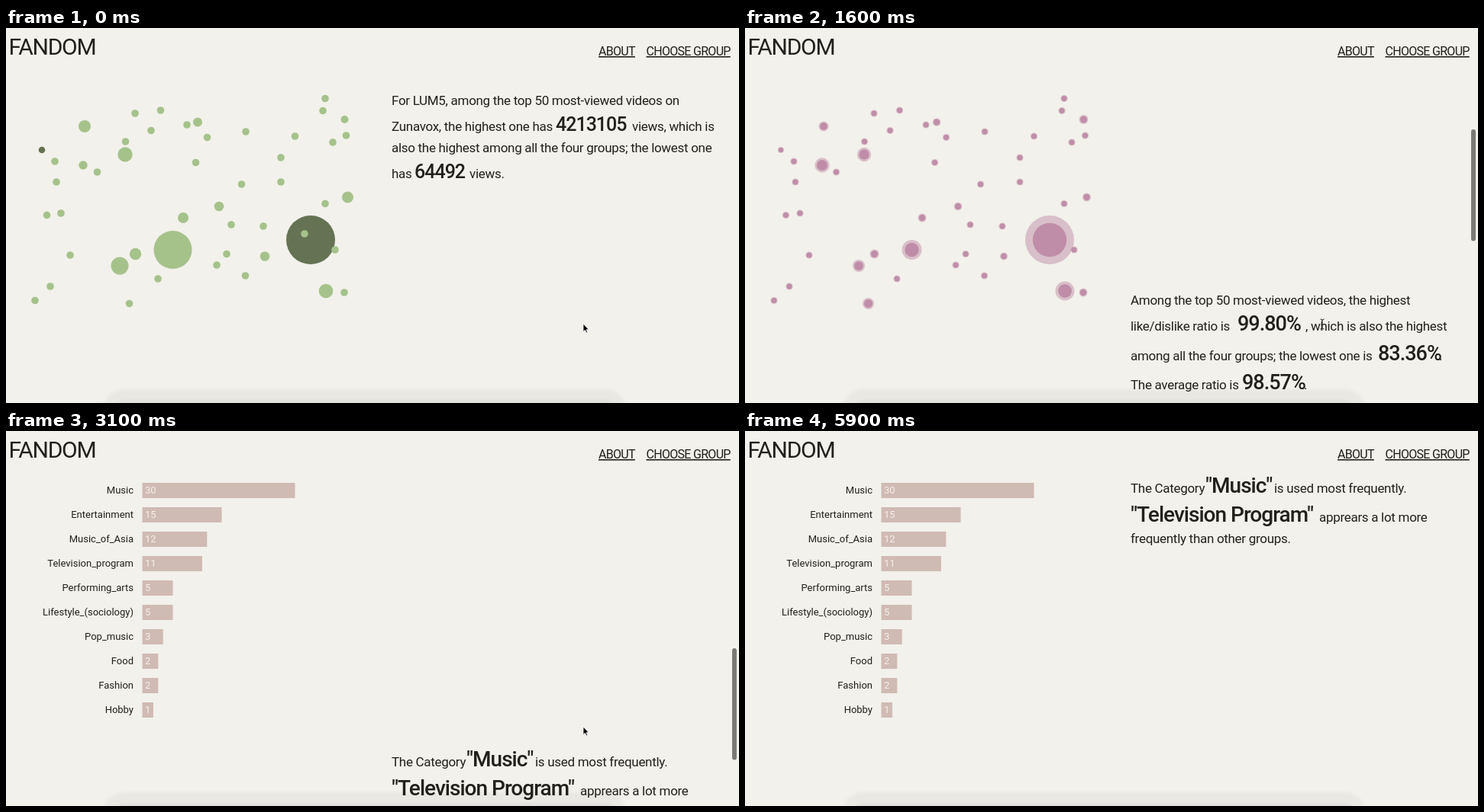
These frames come from a looping animation (960 px wide and 492 px high, 6600 ms). An HTML page:

```html
<!DOCTYPE html>
<html lang="en">
<head>
<meta charset="utf-8">
<title>Fandom</title>
<style>
html, body { margin: 0; width: 100%; height: 100%; overflow: hidden; background: #f2f1eb; }
svg { display: block; width: 100vw; height: 100vh; font: 17px Roboto, sans-serif; fill: #21201c; }
#story text { letter-spacing: -.3px; white-space: pre; }
#story .big { font-weight: 500; letter-spacing: -1px; }
.logo { font-size: 30px; letter-spacing: -1.3px; }
.nav { font-size: 16px; letter-spacing: -.7px; text-decoration: underline; }
#bars { font-size: 13px; }
#bars rect { fill: #d0bab4; }
#bars .value { fill: #f6efe9; }
#bars .label { text-anchor: end; }
</style>
</head>
<body>
<svg viewBox="0 0 960 492">
  <defs>
    <filter id="soft" x="-5%" width="110%" y="-50%" height="200%"><feGaussianBlur stdDeviation="2"/></filter>
  </defs>
  <g id="dots"></g>
  <g id="bars"></g>
  <g id="story"></g>
  <rect width="960" height="44" fill="#f2f1eb"/>
  <text class="logo" x="3.5" y="35">FANDOM</text>
  <text class="nav" x="776" y="36">ABOUT</text>
  <text class="nav" x="838.5" y="36">CHOOSE GROUP</text>
  <g filter="url(#soft)">
    <rect x="128" y="474" width="684" height="60" rx="26" fill-opacity=".035"/>
    <rect x="142" y="488" width="658" height="40" rx="14" fill-opacity=".04"/>
  </g>
  <rect id="thumb" x="951" width="6" height="146.5" rx="3" fill="#7b7a76"/>
  <g id="cursor">
    <path id="arrow" d="M0 0V10.5L2.4 8.3L4 12L5.6 11.3L4.1 7.7H7.2Z" fill="#000" stroke="#fff" stroke-width=".8"/>
    <path id="beam" d="M-2.5-6Q0-6 0-4Q0-6 2.5-6M0-4V5M-2.5 7Q0 7 0 5Q0 7 2.5 7M-1.5 1.5H1.5" fill="none" stroke="#222"/>
  </g>
</svg>
<script>
const LOOP = 6600, STEP = 100;
const ORIGIN = [3, 48];
const GREEN = [166, 194, 139], DARK = [101, 114, 83], PINK = [192, 141, 168];

// x, y of every video
const spots = [
  103,129, 169,112, 202.5,108, 190,134.5, 237,127, 251,123.5, 263.5,143.5, 156.5,149, 156,166, 47,160,
  64,175, 101,180, 119.5,189, 66,202, 53.5,245.5, 72,243, 84,298, 58,339, 38,357.5, 161.5,361.5,
  199,329, 149,312, 169.5,296.5, 218.5,291, 232,249, 248.5,176.5, 279,234, 295,258, 289,296.5, 276,311,
  313.5,325, 339,299.5, 337,260, 308.5,205, 314,136, 360,170, 360,202, 378.5,142, 415,108.5, 418,92.5,
  443.5,120, 428,150, 445.5,141, 418,230.5, 447.5,222, 399,278, 391,270, 431,291, 419,345, 443,347
];
// radius by views, radius by ratio, where they differ from the usual
const USUAL = [4.8, 4.6];
const radii = {
  0: [8, 6.5], 5: [6, 5.3], 8: [9.7, 9.2], 9: [4.3, 4], 11: [5.7, 9.7], 19: [4.8, 7.5],
  21: [11.5, 8], 22: [7.7, 6], 23: [25, 13], 24: [7, 5.5], 26: [6.3, 5.3], 31: [6.3, 5],
  40: [5, 6], 44: [7.5, 5.5], 45: [32, 32], 48: [9.3, 12.5], 49: [4.8, 5.5]
};
const darkOnes = [9, 45];

const categories = {
  Music: 30, Entertainment: 15, Music_of_Asia: 12, Television_program: 11, Performing_arts: 5,
  "Lifestyle_(sociology)": 5, Pop_music: 3, Food: 2, Fashion: 2, Hobby: 1
};

// each piece: x, y, text, size when emphasised
const story = [
  [505, 101, "For LUM5, among the top 50 most-viewed videos on"],
  [505, 135, "Zunavox, the highest one has"], [720, 135, "4213105", 25], [820, 135, "views, which is"],
  [505, 163, "also the highest among all the four groups; the lowest one"],
  [505, 197, "has"], [535, 197, "64492", 25], [607, 197, "views."],

  [505, 673, "Among the top 50 most-viewed videos, the highest"],
  [505, 707, "like/dislike ratio is"], [645, 707, "99.80%", 27], [734, 707, ", which is also the highest"],
  [505, 746, "among all the four groups; the lowest one is"], [829, 746, "83.36%", 27], [909, 746, "."],
  [505, 784, "The average ratio is"], [651, 784, "98.57%", 27], [732, 784, "."],

  [505, 1255, "The Category"], [603, 1255, '"Music"', 28], [693, 1255, "is used most frequently."],
  [505, 1293, '"Television Program"', 28], [752, 1293, "apprears a lot more"],
  [505, 1321, "frequently than other groups."]
];

// time, page scroll
const scrollKeys = [
  [0, 0], [100, 13], [700, 156], [1100, 207], [1400, 259], [2000, 413], [2800, 737],
  [3100, 815], [3900, 1051], [4200, 1102], [4600, 1169], [4800, 1174], [LOOP, 1174]
];

const $ = id => document.getElementById(id);
const clamp = v => Math.max(0, Math.min(1, v));
const mix = (a, b, k) => a + (b - a) * k;
const ease = v => (v = clamp(v)) < .5 ? 4 * v ** 3 : 1 - 4 * (1 - v) ** 3;

function set(el, attrs) {
  for (const name in attrs) el.setAttribute(name, attrs[name]);
}
function add(parent, tag, attrs, text = "") {
  const el = document.createElementNS("http://www.w3.org/2000/svg", tag);
  set(el, attrs);
  el.textContent = text;
  return parent.appendChild(el);
}

const dots = [];
for (let i = 0; i < spots.length / 2; i++) {
  const [views, ratio] = radii[i] || USUAL;
  dots.push({
    x: spots[2 * i], y: spots[2 * i + 1], views, ratio,
    color: darkOnes.includes(i) ? DARK : GREEN
  });
}
for (const d of dots) d.outer = add($("dots"), "circle", { cx: d.x, cy: d.y });
for (const d of dots) d.inner = add($("dots"), "circle", { fill: `rgb(${PINK})` });

const bars = Object.entries(categories).map(([name, count], i) => {
  const y = 68 + 32 * i;
  const rect = add($("bars"), "rect", { x: 178.5, y, height: 20 });
  add($("bars"), "text", { class: "value", x: 182, y: y + 14 }, count);
  add($("bars"), "text", { class: "label", x: 167, y: y + 14 }, name);
  return { rect, width: 8 + 6.4 * count };
});

for (const [x, y, text, size] of story)
  add($("story"), "text", size ? { x, y, class: "big", "font-size": size } : { x, y }, text);

function scrollAt(t) {
  const i = scrollKeys.findIndex(key => key[0] > t);
  const [t0, s0] = scrollKeys[i - 1], [t1, s1] = scrollKeys[i];
  return mix(s0, s1, (t - t0) / (t1 - t0));
}

function drawDots(t) {
  const enter = ease((t - 754) / 500), leave = ease((t - 2820) / 250);
  const grow = enter * (1 - leave);
  const fade = 1 - clamp((t - 2600) / 200);
  for (const d of dots) {
    set(d.outer, {
      r: mix(d.views, d.ratio, enter),
      fill: `rgb(${d.color.map((c, i) => Math.round(mix(c, PINK[i], enter)))})`,
      opacity: mix(1, .5, enter) * fade
    });
    set(d.inner, {
      cx: mix(ORIGIN[0], d.x, grow),
      cy: mix(ORIGIN[1], d.y, grow),
      r: (.68 * d.ratio + .4) * grow
    });
  }
  $("bars").style.display = t < 2900 ? "none" : "";
  for (const b of bars) b.rect.setAttribute("width", b.width * leave);
}

function drawCursor(t) {
  const overText = t >= 1500 && t < 1900 || t >= 3300 && t < 4200;
  const away = clamp((t - 5300) / 500) ** 2;
  $("arrow").style.display = overText ? "none" : "";
  $("beam").style.display = overText ? "" : "none";
  set($("cursor"), {
    transform: `translate(${mix(756, 642, away)} ${mix(388, 48, away)})`,
    opacity: t < 5900 ? 1 : 0
  });
}

function draw(now) {
  const t = Math.floor(now % LOOP / STEP) * STEP;
  const scroll = scrollAt(t);
  $("story").setAttribute("transform", `translate(0 ${-scroll})`);
  set($("thumb"), {
    y: 39.6 + scroll / 3.32,
    opacity: t < 100 ? 0 : 1 - clamp((t - 5300) / 400)
  });
  drawDots(t);
  drawCursor(t);
}

function tick() {
  draw(performance.now());
  requestAnimationFrame(tick);
}
tick();
</script>
</body>
</html>
```
